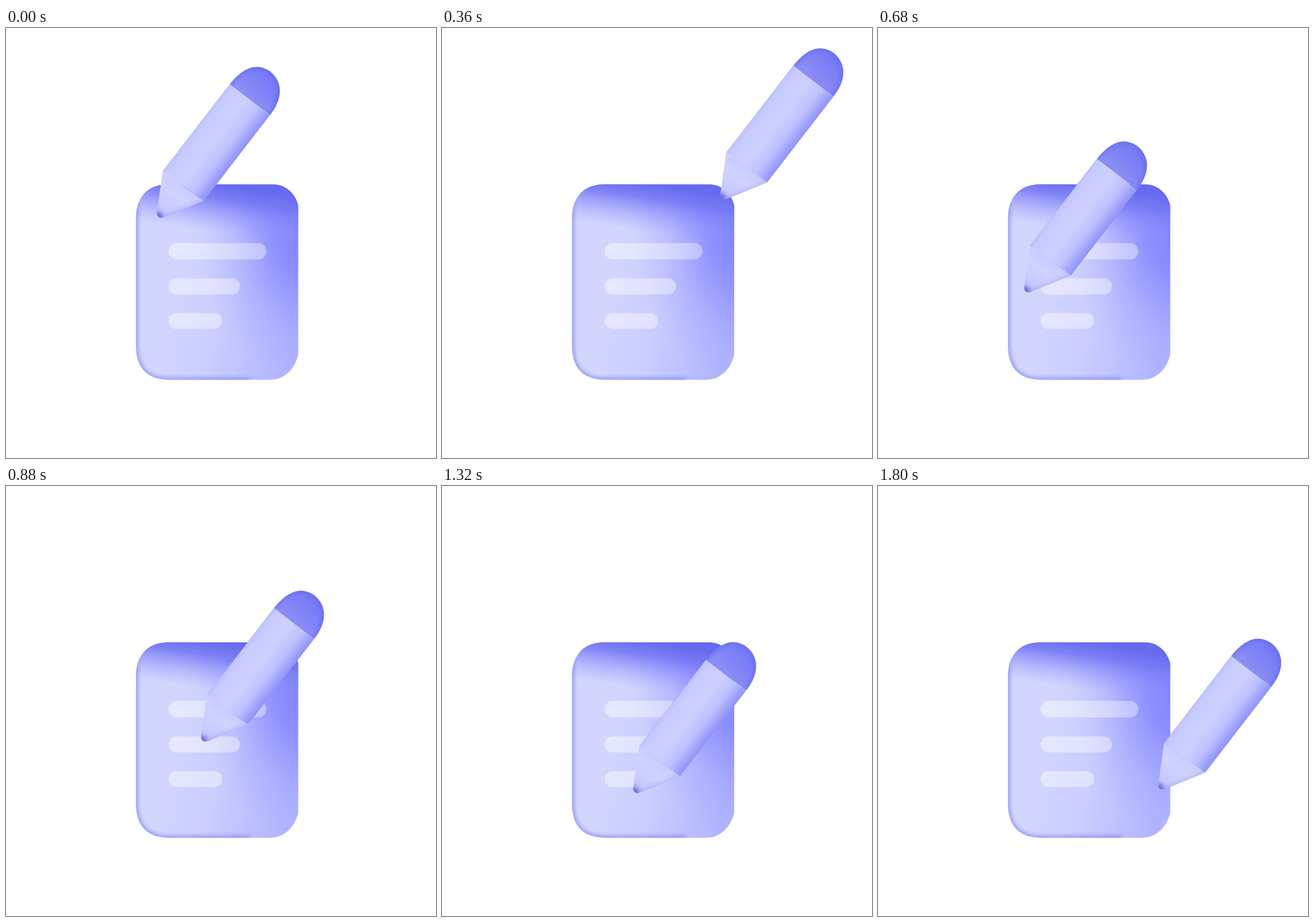
Write an HTML page that moves like this. It is 748 px wide and 748 px high and loops after 1.84 s.

```html
<!DOCTYPE html>
<html lang="en">
<head>
<meta charset="utf-8">
<title>Pencil and note</title>
<style>
  html, body { margin: 0; width: 100%; height: 100%; overflow: hidden; background: #fff; }
  svg { display: block; width: 100vw; height: 100vh; }
</style>
</head>
<body>
<svg viewBox="0 0 748 748">
  <defs>
    <path id="sheet" d="M226 332C226 294 246 271.500 284 271.500L466 272C486 272 504 288 508.500 309V568C503 593 484 612 460 612H284C246 612 226 592 226 552Z"/>
    <path id="body" d="M272.500 249L389 98L459 152L344 301Z"/>
    <path id="cap" d="M389 98C403 80 420 67.500 436 67.500C458 67.500 476.500 87 476.500 109C476.500 125 469 139 459 152Z"/>
    <path id="cone" d="M272.500 249L344 301L274 329.500C267 332 261.500 327 262.500 320Z"/>
    <clipPath id="inSheet"><use href="#sheet"/></clipPath>
    <clipPath id="inBody"><use href="#body"/></clipPath>
    <clipPath id="inCap"><use href="#cap"/></clipPath>
    <clipPath id="inCone"><use href="#cone"/></clipPath>

    <filter id="soft" filterUnits="userSpaceOnUse" x="150" y="0" width="450" height="700"><feGaussianBlur stdDeviation="3.500"/></filter>
    <filter id="wide" filterUnits="userSpaceOnUse" x="150" y="0" width="450" height="700"><feGaussianBlur stdDeviation="8"/></filter>

    <g id="defsGradients">
      <linearGradient id="base" gradientUnits="userSpaceOnUse" x1="290" y1="430" x2="510" y2="470">
        <stop offset="0" stop-color="#d2d6ff"/>
        <stop offset=".4" stop-color="#cacdff"/>
        <stop offset="1" stop-color="#b0b4ff"/>
      </linearGradient>
      <radialGradient id="side" gradientUnits="userSpaceOnUse" cx="0" cy="0" r="1" gradientTransform="translate(520 355) scale(185 255)">
        <stop offset="0" stop-color="#7a7bff" stop-opacity=".9"/>
        <stop offset=".3" stop-color="#7e80ff" stop-opacity=".72"/>
        <stop offset=".65" stop-color="#8688ff" stop-opacity=".26"/>
        <stop offset="1" stop-color="#9a9cff" stop-opacity="0"/>
      </radialGradient>
      <linearGradient id="top" gradientUnits="userSpaceOnUse" x1="360" y1="270" x2="347" y2="354">
        <stop offset="0" stop-color="#666aee"/>
        <stop offset=".3" stop-color="#7376f4" stop-opacity=".88"/>
        <stop offset=".65" stop-color="#8486fa" stop-opacity=".42"/>
        <stop offset="1" stop-color="#9496ff" stop-opacity="0"/>
      </linearGradient>
      <linearGradient id="bar" gradientUnits="userSpaceOnUse" x1="283" y1="0" x2="453" y2="0">
        <stop offset="0" stop-color="#fff" stop-opacity=".46"/>
        <stop offset="1" stop-color="#fff" stop-opacity=".37"/>
      </linearGradient>
      <linearGradient id="barrel" gradientUnits="userSpaceOnUse" x1="331" y1="174" x2="401" y2="228">
        <stop offset="0" stop-color="#bfc2ff"/>
        <stop offset=".1" stop-color="#c8cbff"/>
        <stop offset=".45" stop-color="#cdd0ff"/>
        <stop offset=".72" stop-color="#bdc0ff"/>
        <stop offset="1" stop-color="#9598fa"/>
      </linearGradient>
      <linearGradient id="dome" gradientUnits="userSpaceOnUse" x1="414" y1="128" x2="466" y2="82">
        <stop offset="0" stop-color="#9092f2"/>
        <stop offset=".45" stop-color="#8285f6"/>
        <stop offset="1" stop-color="#7477f5"/>
      </linearGradient>
      <linearGradient id="wood" gradientUnits="userSpaceOnUse" x1="308" y1="275" x2="265" y2="330">
        <stop offset="0" stop-color="#c9ccff"/>
        <stop offset=".3" stop-color="#d0d3ff"/>
        <stop offset=".75" stop-color="#c6c9ff"/>
        <stop offset="1" stop-color="#a9abf7"/>
      </linearGradient>
    </g>
  </defs>

  <g clip-path="url(#inSheet)">
    <use href="#sheet" fill="url(#base)"/>
    <use href="#sheet" fill="url(#side)"/>
    <use href="#sheet" fill="url(#top)"/>
    <path d="M226 270V552C226 592 246 612 284 612H424" fill="none" stroke="#7b7eee" stroke-width="6" opacity=".85" filter="url(#soft)"/>
  </g>
  <g fill="url(#bar)">
    <rect x="283" y="374" width="170" height="28.500" rx="14.250"/>
    <rect x="283" y="435.500" width="124" height="28" rx="14"/>
    <rect x="283" y="496" width="93" height="27.500" rx="13.750"/>
  </g>

  <g id="pencil">
    <g clip-path="url(#inCone)">
      <use href="#cone" fill="url(#wood)"/>
      <path d="M344 301L274 330" stroke="#9295f4" stroke-width="5" opacity=".6" filter="url(#soft)"/>
      <circle cx="264" cy="328" r="8" fill="#6669dc" filter="url(#soft)"/>
    </g>
    <g clip-path="url(#inBody)">
      <use href="#body" fill="url(#barrel)"/>
      <path d="M459 152L344 301" stroke="#8487f5" stroke-width="9" opacity=".55" filter="url(#wide)"/>
      <path d="M272 249L389 98" stroke="#9a9df8" stroke-width="2" opacity=".5"/>
    </g>
    <path d="M286 259L344 301" stroke="#b8bbfa" stroke-width="1" opacity=".7"/>
    <g clip-path="url(#inCap)">
      <use href="#cap" fill="url(#dome)"/>
      <path d="M389 98C403 80 420 67.500 436 67.500C458 67.500 476.500 87 476.500 109C476.500 125 469 139 459 152" fill="none" stroke="#666af0" stroke-width="7" opacity=".75" filter="url(#soft)"/>
    </g>
  </g>
</svg>
<script>
  const LOOP = 1840, STEP = 40;
  // time, x, y: straight strokes between the turning points
  const path = [
    [0, 0, 0],
    [380, 234, -34],
    [698, -23, 139.5],
    [1092, 193, 85.5],
    [1320, 70, 204],
    [1448, 4, 267],
    [1800, 225, 198]
  ];
  const pencil = document.getElementById('pencil');

  function place(t) {
    const i = Math.max(1, path.findIndex(p => p[0] >= t));
    const [t0, x0, y0] = path[i - 1], [t1, x1, y1] = path[i];
    const k = (t - t0) / (t1 - t0);
    return [x0 + (x1 - x0) * k, y0 + (y1 - y0) * k];
  }

  const start = performance.now();
  function draw(now) {
    const t = Math.max(0, now - start) % LOOP;
    const [x, y] = place(Math.floor(t / STEP) * STEP);
    pencil.setAttribute('transform', `translate(${x.toFixed(1)} ${y.toFixed(1)})`);
    requestAnimationFrame(draw);
  }
  draw(start);
</script>
</body>
</html>
```
